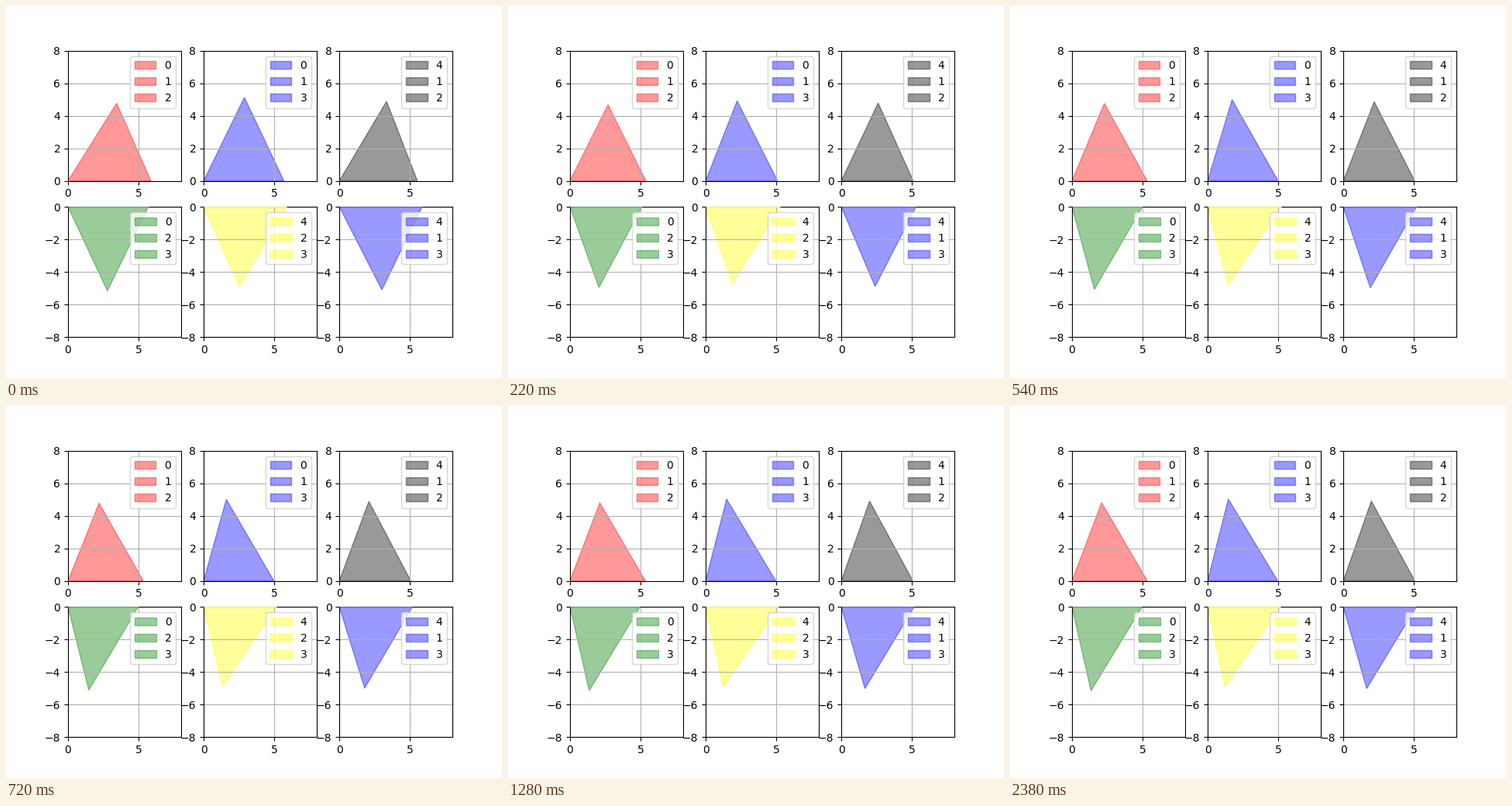
Recreate the animation shown at these times as a matplotlib script. Size 640 by 480 pixels, loop 2400 ms.

```python
import numpy as np
import matplotlib.pyplot as plt
from matplotlib.animation import FuncAnimation
from matplotlib.colors import to_rgb
from matplotlib.patches import Patch, Polygon

FRAMES = 120
INTERVAL = 20
ALPHA = 0.4
SLOW_RATE, FAST_RATE = 0.07, 0.2

# Five nodes form a double pyramid: 0 and 4 are the poles, 1 to 3 the rim.
# Each edge has a length at the start and at rest.
EDGES = {
    "01": (5.88, 5.24), "02": (5.87, 5.33), "03": (5.68, 4.96),
    "14": (5.92, 5.29), "24": (5.52, 5.06), "34": (5.86, 5.16),
    "12": (5.35, 5.79), "13": (5.84, 6.13), "23": (5.92, 6.30),
}
LAG = {"1": 0.25, "2": -0.07, "3": 0.13}  # slow part of the pole edges

# one face per panel
FACES = [("012", "red"), ("013", "blue"), ("412", "black"),
         ("023", "green"), ("423", "yellow"), ("413", "blue")]


def length(a, b, step):
    """Edge length relaxing to rest through a slow and a fast decay."""
    key = "".join(sorted(a + b))
    start, rest = EDGES[key]
    poles = set(key) & {"0", "4"}
    if poles:
        slow = LAG[(set(key) - poles).pop()]
    else:
        slow = -0.5 * (rest - 3.8)
    fast = start - rest - slow
    return rest + slow * np.exp(-SLOW_RATE * step) + fast * np.exp(-FAST_RATE * step)


def corners(nodes, sign, step):
    """Lay a face flat: first node at the origin, third on the x axis."""
    a, b, c = nodes
    left, base, right = length(a, b, step), length(a, c, step), length(b, c, step)
    x = (left**2 + base**2 - right**2) / (2 * base)
    y = np.sqrt(left**2 - x**2)
    return [(0, 0), (base, 0), (x, sign * y)]


class FacePanel:
    def __init__(self, ax, nodes, color, sign):
        self.nodes, self.sign = nodes, sign
        style = dict(color=color, alpha=ALPHA)
        self.face = ax.add_patch(Polygon([(0, 0)] * 3, closed=True, **style))
        # the base edge lies over the axis line, as a solid tint
        tint = 1 - (1 - (1 - ALPHA)**2) * (1 - np.array(to_rgb(color)))
        self.base, = ax.plot([], [], color=tint, lw=1, zorder=3,
                             solid_capstyle="butt")
        ax.set_xlim(0, 8)
        ax.set_ylim(min(0, 8 * sign), max(0, 8 * sign))
        ax.set_xticks([0, 5])
        ax.set_yticks(sorted(sign * y for y in range(0, 9, 2)))
        ax.grid(True)
        ax.legend(handles=[Patch(label=n, **style) for n in nodes],
                  loc="upper right")

    def draw(self, step):
        points = corners(self.nodes, self.sign, step)
        self.face.set_xy(points)
        self.base.set_data(*zip(*points[:2]))


fig, axes = plt.subplots(2, 3, figsize=(6.4, 4.8), dpi=100)
panels = [FacePanel(ax, nodes, color, sign)
          for ax, (nodes, color), sign in zip(axes.flat, FACES, [1] * 3 + [-1] * 3)]


def update(step):
    for panel in panels:
        panel.draw(step)
    return [panel.face for panel in panels]


anim = FuncAnimation(fig, update, frames=FRAMES, interval=INTERVAL,
                     init_func=lambda: update(0), repeat=True, repeat_delay=0)
plt.show()
```
